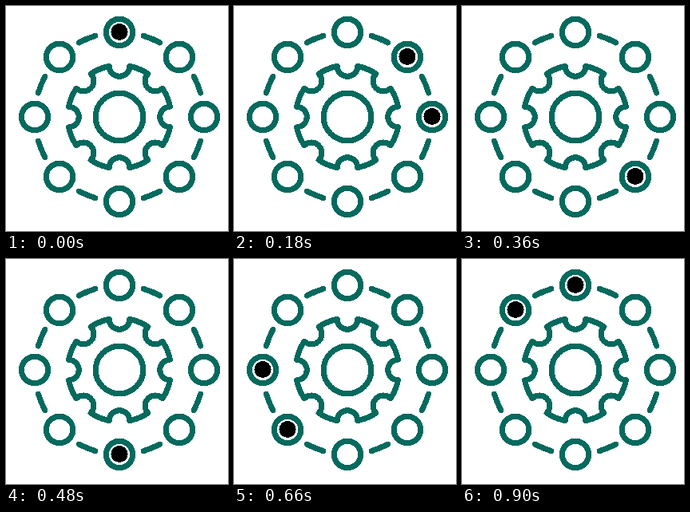
An HTML page with a canvas for the animation above (0.96 s loop, 278 by 282 pixels).

```html
<!DOCTYPE html>
<html lang="en">
<head>
<meta charset="utf-8">
<style>
  html, body { margin: 0; height: 100%; overflow: hidden; background: #fff; }
  canvas { display: block; filter: url(#crisp); }
  svg { position: absolute; }
</style>
</head>
<body>
<!-- Turns soft edges into hard ones -->
<svg width="0" height="0">
  <filter id="crisp" x="0" y="0" width="1" height="1" color-interpolation-filters="sRGB">
    <feComponentTransfer><feFuncA type="linear" slope="40" intercept="-18"/></feComponentTransfer>
  </filter>
</svg>
<canvas id="stage" width="278" height="282"></canvas>
<script>
const ctx = document.getElementById('stage').getContext('2d');
const TAU = Math.PI * 2, NODES = 8, STEP = 120, LOOP = NODES * STEP;
const ORBIT = 106, GEAR = 64.8, TEAL = '#046a5d';
const rad = deg => deg * Math.PI / 180;

// Angles run clockwise from the top, around the gear's centre.
const polar = (r, deg) => [r * Math.sin(rad(deg)), -r * Math.cos(rad(deg))];

function circle(x, y, r) {
  ctx.beginPath();
  ctx.arc(x, y, r, 0, TAU);
}

function drawGear() {
  const half = 11.4;
  const notch = GEAR * Math.sin(rad(half)), depth = GEAR * Math.cos(rad(half));
  ctx.beginPath();
  for (let a = 0; a < 360; a += 45) {
    const [x, y] = polar(depth, a);
    ctx.arc(x, y, notch, rad(a + 180), rad(a), true);
    ctx.arc(0, 0, GEAR, rad(a + half - 90), rad(a + 45 - half - 90));
  }
  ctx.closePath();
  ctx.stroke();
  circle(0, 0, 29.8);
  ctx.stroke();
}

function drawOrbit() {
  for (let a = 0; a < 360; a += 45) {
    circle(...polar(ORBIT, a), 16.75);
    ctx.stroke();
    ctx.beginPath();
    ctx.arc(0, 0, ORBIT, rad(a + 16.5 - 90), rad(a + 28.5 - 90));
    ctx.stroke();
  }
}

function drawDot(node) {
  const [x, y] = polar(ORBIT, node * 45);
  circle(x, y - 0.5, 10.5);
  ctx.fill();
}

function draw(now) {
  const t = now % LOOP, node = Math.floor(t / STEP);
  ctx.setTransform(1, 0, 0, 1, 0, 0);
  ctx.clearRect(0, 0, 278, 282);
  ctx.translate(142, 139);
  ctx.strokeStyle = TEAL;
  ctx.lineWidth = 7;
  ctx.lineCap = ctx.lineJoin = 'round';
  drawGear();
  drawOrbit();
  ctx.fillStyle = '#000';
  drawDot(node);
  // The next dot lights up before the current one goes out.
  if (t % STEP >= 40) drawDot(node + 1);
}

const start = performance.now();
function tick() {
  draw(performance.now() - start);
  requestAnimationFrame(tick);
}
tick();
</script>
</body>
</html>
```
